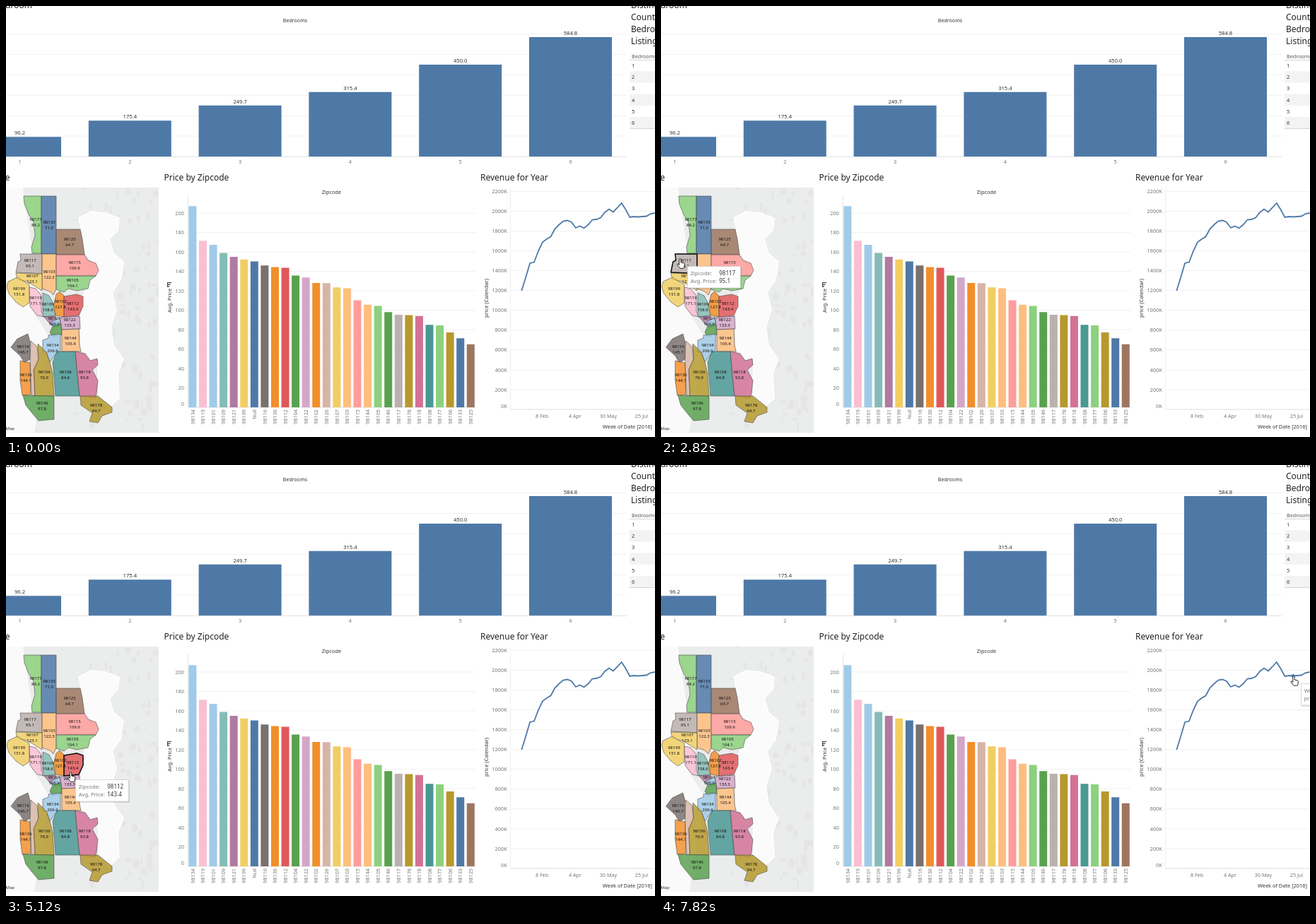
These frames come from a looping animation (918 px wide and 610 px high, 8000 ms). An HTML page:

```html
<!DOCTYPE html>
<html lang="en">
<head>
<meta charset="utf-8">
<style>
html, body { margin: 0; width: 100%; height: 100%; overflow: hidden; background: #fff; }
svg { display: block; width: 918px; height: 610px; font: 7.4px "Noto Sans", "Open Sans", sans-serif; }
</style>
</head>
<body>
<svg id="stage" viewBox="0 0 918 610"></svg>
<script>
const BLUE = '#4e79a7', GRID = '#f1f1f1';
const out = [], marks = {};

const add = s => out.push(s);
const path = (d, style) => add(`<path d="${d}" ${style}/>`);
const line = (d, color = GRID, width = 1) => path(d, `fill="none" stroke="${color}" stroke-width="${width}"`);
const box = (x, y, w, h) => `M${x} ${y}h${w}v${h}h${-w}z`;
const textTag = (s, x, y, { size = 7.4, color = '#333', anchor = 'start', turn = 0, weight = 400 } = {}) =>
  `<text x="${x}" y="${y}" font-size="${size}" fill="${color}" text-anchor="${anchor}" font-weight="${weight}"` +
  `${turn ? ` transform="rotate(${turn} ${x} ${y})"` : ''}>${s}</text>`;
const text = (...args) => add(textTag(...args));
const title = (s, x, y, anchor) => text(s, x, y, { size: 12, color: '#222', anchor });

// Price by bedroom
title('Price by Bedroom', 37, 3, 'end');
text('Bedrooms', 409, 22.5, { size: 7.1, anchor: 'middle' });
for (let i = 1; i < 7; i++) line(`M0 ${(213 - i * 28.9).toFixed(1)}H878`);
line('M0 213.5H878', '#e2e2e2');
const bedPrices = [96.2, 175.4, 249.7, 315.4, 450, 584.8];
bedPrices.forEach((price, i) => {
  const x = -39 + i * 155.8, h = price * 0.289;
  marks['bed' + (i + 1)] = { d: box(x, 213 - h, 117, h), rows: [['Bedrooms:', i + 1], ['Avg. Price:', price.toFixed(1)]], w: 69.5 };
  path(marks['bed' + (i + 1)].d, `fill="${BLUE}"`);
  text(price.toFixed(1), x + 58.5, 210 - h, { size: 7.6, anchor: 'middle' });
  text(i + 1, x + 58.5, 223, { color: '#777', anchor: 'middle' });
});

// Listing table
['Distinct', 'Count of', 'Bedroom', 'Listings'].forEach((s, i) => title(s, 884, 3 + i * 17));
text('Bedrooms', 885, 73.5, { size: 7.2, color: '#555' });
for (let i = 0; i < 6; i++) {
  if (i % 2) path(box(882, 76 + i * 16.2, 36, 16.2), 'fill="#f3f3f3"');
  text(i + 1, 885, 87 + i * 16.2);
}
line('M882 76.5H918M882 173.5H918', '#d4d4d4');

// Price by zipcode
const prices = {}, colors = {};
title('Price by Zipcode', 223.5, 246.5);
text('Zipcode', 460.5, 265.5, { anchor: 'middle' });
for (let v = 0; v <= 200; v += 20) {
  const y = 568 - v * 1.375;
  line(`M257 ${y}H665`, v ? GRID : '#ddd');
  text(v, 252, v ? y + 2.6 : 565.6, { color: '#777', anchor: 'end' });
}
line('M257.5 268V568', '#e6e6e6');
text('Avg. Price', 233.5, 434, { turn: -90 });
line('M228 391.5h6M228 394.2h4.5M228 396.9h3', '#333', 1.2);
line('M228.5 391V398', '#333', 0.9);
`98134 206.6 a0cbe8,98119 171.1 fabfd2,98101 166.9 a0cbe8,98109 158.6 86bcb6,98121 154.5 b07aa1,98199 151.8 f1ce63,
Null 149.8 4e79a7,98116 145.7 79706e,98136 144.1 f28e2b,98112 143.4 e15759,98104 135.4 59a14f,98122 133.3 d4a6c8,
98102 127.8 f28e2b,98126 127.5 d7b5a6,98107 123.1 f1ce63,98103 122.3 ffbe7d,98115 109.9 ff9d9a,98144 105.4 ffbe7d,
98105 104.1 8cd17d,98146 97.8 59a14f,98117 95.1 bab0ac,98178 94.7 b6992d,98118 93.8 d37295,98108 84.8 499894,
98177 84.2 8cd17d,98106 76.9 b6992d,98133 71.0 4e79a7,98125 64.7 9d7660`.split(',').forEach((row, i) => {
  const [zip, price, color] = row.trim().split(' ');
  const x = 258.4 + i * 14.57, h = price * 1.378;
  prices[zip] = price;
  colors[zip] = '#' + color;
  marks['bar' + zip] = { d: box(x, 568 - h, 11, h), rows: zipRows(zip), w: 74 };
  path(marks['bar' + zip].d, `fill="#${color}"`);
  text(zip, x + 8.2, 571, { size: 7.3, color: '#777', anchor: 'end', turn: -90 });
});
function zipRows(zip) { return [['Zipcode:', zip], ['Avg. Price:', prices[zip]]]; }

// Map
const LAND = 'M24 257H216V604H40L62 470 34 425 50 400 38 350Z';
title('Price by Zipcode', 5.5, 246.5, 'end');
add(`<clipPath id="land"><path d="${LAND}"/></clipPath>`);
path(box(0, 257, 216, 347), 'fill="#fafafa"');
path(LAND, 'fill="#ebecec"');
let seed = 7;
const rand = () => (seed = seed * 16807 % 2147483647) / 2147483647;
add('<g clip-path="url(#land)" fill="#dcdddd" opacity=".4">');
for (let i = 0; i < 90; i++)
  add(`<ellipse cx="${(100 + rand() * 116).toFixed(1)}" cy="${(257 + rand() * 347).toFixed(1)}" rx="${(1 + rand() * 4).toFixed(1)}" ry="${(1 + rand() * 6).toFixed(1)}"/>`);
add('</g>');
path('M103 300L107 318 113 352 131 370 118 392 108 412 106 440 106 485 120 500 131 500 130 530 131 553 148 566 160 555 158 520 166 500 152 480 148 455 156 430 150 405 162 388 166 362 152 350 146 330 158 318 160 300 140 293 120 291Z',
  'fill="#fbfbfb" stroke="#fff" stroke-width="1.5"');

const labels = [];
function zone(zip, points, x, y) {
  const d = `M${points}Z`;
  marks['zone' + zip] = { d, rows: zipRows(zip), w: 75, bold: true };
  path(d, `fill="${colors[zip]}" fill-opacity=".84" stroke="#4a4a4a" stroke-width=".6" stroke-linejoin="round"`);
  if (x) [zip, prices[zip]].forEach((s, i) =>
    labels.push(textTag(s, x, y + 2.2 + i * 7.8, { size: 6, color: '#111', anchor: 'middle' })));
}
zone('98177', '25 269H50V350H37L36 341 41 325 39 306 32 295 26 280', 42, 302);
zone('98133', '50 269H71V351H50', 61, 305.5);
zone('98125', '71 316H105L108 330 111 352H71', 90, 330);
zone('98117', '20 351H51V379L38 378 14 377 17 362 21 360', 34, 360);
zone('98103', '51 351H71V400L67 409 62 404 51 400', 61, 375.5);
zone('98115', '71 352H111L116 360 127 364 131 374 127 382H71', 97, 363);
zone('98105', '71 382H127L119 388 116 400 100 403 88 400 82 405 71 401', 94, 387.5);
zone('98107', '14 378L51 379V403L40 396 30 390 16 387', 37, 382);
zone('98199', '3 390L16 384 24 389 33 394V420L24 426 14 419 4 407 1 397', 18.5, 400);
zone('98119', '33 398L42 400 50 410V433L56 440 44 438 34 425', 42, 413);
zone('98109', '52 406L61 410 70 427V438L52 440', 59, 422);
zone('98102', '71 408L76 404 82 410V440L70 438 67 425', 77, 418);
zone('98112', '82 411L100 408 109 411V425L103 438 82 440', 94.5, 420.5);
zone('98122', '77 441L104 439 105 457 78 458', 90, 443.5);
zone('98121', '54 440L70 439 72 452 64 452');
zone('98101', '62 448L76 441 77 453 68 455', 68, 442);
zone('98104', '66 453L78 450 79 465 66 468 62 462');
zone('98144', '79 458L103 457 104 480 106 489H79', 91, 470);
zone('98134', '60 466L77 464V488L70 493 62 504 57 490H52V473L60 470', 66, 480);
zone('98116', '16 471L31 464 34 475V500L26 505 20 495 7 483', 24, 482);
zone('98126', '35 474L44 482 46 500 40 515 41 552H36L34 500');
zone('98136', '20 502L34 505 35 550 23 551 20 530', 28, 522);
zone('98106', '45 478L57 490 62 504 66 520 68 552H41L39 515 46 500', 54, 517.5);
zone('98108', '66 504L72 489H98L100 515 104 552H70L68 525', 84, 517.5);
zone('98118', '98 489L112 492 119 502 129 499 130 508 122 515 130 530 128 548 126 555 104 552', 111, 518);
zone('98146', '24 551L68 552V585L46 587 36 575 28 565', 51, 562);
zone('98178', '105 552H130L150 568V575L136 580 130 590 118 588 122 576 106 565', 127.5, 565);
add(labels.join(''));
text('Map', 12, 600, { size: 6, anchor: 'end' });

// Revenue for year
title('Revenue for Year', 671, 246.5);
for (let i = 0; i <= 11; i++) {
  const y = 571 - i * 28.05;
  line(`M713 ${y}H918`, i ? GRID : '#ddd');
  text(i * 200 + 'K', 709, i ? y + 2.6 : 568.6, { color: '#777', anchor: 'end', size: 7.5 });
}
line('M713.5 258V571', '#eee');
['8 Feb', '4 Apr', '30 May', '25 Jul'].forEach((s, i) => text(s, 758 + i * 47, 583, { color: '#777', anchor: 'middle', size: 7.2 }));
text('Week of Date [2016]', 844, 597.5);
text('price (Calendar)', 681.5, 413.5, { anchor: 'middle', turn: -90 });
const revenue = [403, 384, 364, 362.5, 347, 334.5, 330, 326.5, 315.5, 309.5, 304.5, 303.5, 306, 314, 311.5, 314.5, 309.5,
  302.5, 302, 299.5, 292, 287.5, 291.5, 285.5, 279, 288, 299, 298, 298.5, 298, 297.5, 294, 293];
line('M' + revenue.map((y, i) => `${(729.3 + i * 5.89).toFixed(1)} ${y}`).join('L'), BLUE, 1.8);
marks.week = { d: 'M892 298.5a2 2 0 1 0 4 0a2 2 0 1 0 -4 0z', rows: [['Week of Date:', '24 July 2016'], ['price:', '1,940K']], w: 112, dot: true };

add(`<path id="glow" stroke-linejoin="round"/><g id="tip"></g>
<path id="hand" d="M-1.2 8.5V.8a1.2 1.2 0 0 1 2.4 0V5l4 .9q1.3.4 1.2 1.8l-.7 4.4q-.2 1.2-1.4 1.2H.6q-.8 0-1.4-.8l-3-4.3q-.4-.9.4-1.3.8-.2 1.2.3z"
  fill="#fff" stroke="#111" stroke-width=".9" stroke-linejoin="round"/>`);
const get = id => document.getElementById(id);
get('stage').innerHTML = out.join('');
const glow = get('glow'), tip = get('tip'), hand = get('hand');

// Pointer stops: time, x, y
const stops = [
  [190, 886, 590], [440, 730, 557], [680, 645, 539], [940, 645, 539], [1140, 464, 468], [1350, 380, 432],
  [1560, 367, 427], [2020, 367, 427], [2290, 22, 361], [2550, 22, 361], [2620, 33, 365], [2820, 28, 359],
  [3020, 28, 359], [3440, 48, 400], [3840, 63, 418], [3980, 63, 427], [4500, 63, 427], [4710, 82, 436],
  [4910, 82, 436], [5190, 96, 436], [5450, 96, 436], [5660, 72, 199], [6060, 72, 199], [6130, 145, 198],
  [6410, 651, 165], [7330, 651, 165], [7820, 896, 300], [8000, 896, 300]];
// Hovered mark: time, mark, pointer position its tooltip hangs from
const hovers = [
  [0], [610, 'bar98133', 645, 539], [1080, 'bar98115', 503, 485], [1210, 'bar98122', 425, 451],
  [1280, 'bar98112', 396, 439], [1350, 'bar98116', 374, 430], [1490, 'bar98116', 367, 427], [2090],
  [2620, 'zone98117', 33, 365], [2760, 'zone98117', 28, 359], [3230, 'zone98107', 37, 380],
  [3440, 'zone98119', 48, 400], [3640, 'zone98109', 56, 409], [3840, 'zone98109', 63, 418],
  [3980, 'zone98109', 63, 427], [4640, 'zone98102', 76, 433], [4710, 'zone98102', 82, 436],
  [5050, 'zone98112', 89, 436], [5190, 'zone98112', 96, 436], [5520], [5660, 'bed1', 72, 199],
  [6130, 'bed1', 92, 199], [6200], [6410, 'bed5', 651, 165], [7400], [7820, 'week', 896, 300]];

const lastAt = (list, t) => list.findLastIndex(k => k[0] <= t);

// The pointer advances in steps of roughly 70 ms
function pointer(t) {
  const i = lastAt(stops, t);
  if (i < 0) return [-50, -50];
  const a = stops[i], b = stops[i + 1] || a, span = b[0] - a[0] || 1;
  const n = Math.max(1, Math.round(span / 69));
  const p = Math.floor((t - a[0]) / span * n + 1e-6) / n;
  return [a[1] + (b[1] - a[1]) * p, a[2] + (b[2] - a[2]) * p];
}

let shown = -1;
function hover(i) {
  if (i === shown) return;
  shown = i;
  const [, id, x, y] = hovers[i], m = marks[id];
  glow.setAttribute('d', m ? m.d : '');
  tip.innerHTML = '';
  if (!m) return;
  glow.setAttribute('fill', m.dot ? BLUE : 'none');
  glow.setAttribute('stroke', m.dot ? BLUE : '#111');
  glow.setAttribute('stroke-width', m.bold ? 1.5 : 1);
  const valueX = x + (m.dot ? 68 : 54.3);
  tip.innerHTML =
    `<path d="${box(x + 10, y + 10.5, m.w + 1, 31.5)}" fill="#000" opacity=".12"/>` +
    `<path d="${box(x + 9.5, y + 9.5, m.w, 30.5)}" fill="#fff" stroke="#cfcfcf" stroke-width=".8"/>` +
    m.rows.map(([label, value], r) =>
      textTag(label, x + 13.7, y + 22.3 + r * 11, { size: 7.6, color: '#787878' }) +
      textTag(value, valueX, y + 22.3 + r * 11, { size: 8, weight: 500 })).join('');
}

function frame() {
  const t = performance.now() % 8000, [x, y] = pointer(t);
  hand.setAttribute('transform', `translate(${x - 1} ${y - 1})`);
  hover(lastAt(hovers, t));
  requestAnimationFrame(frame);
}
frame();
</script>
</body>
</html>
```
